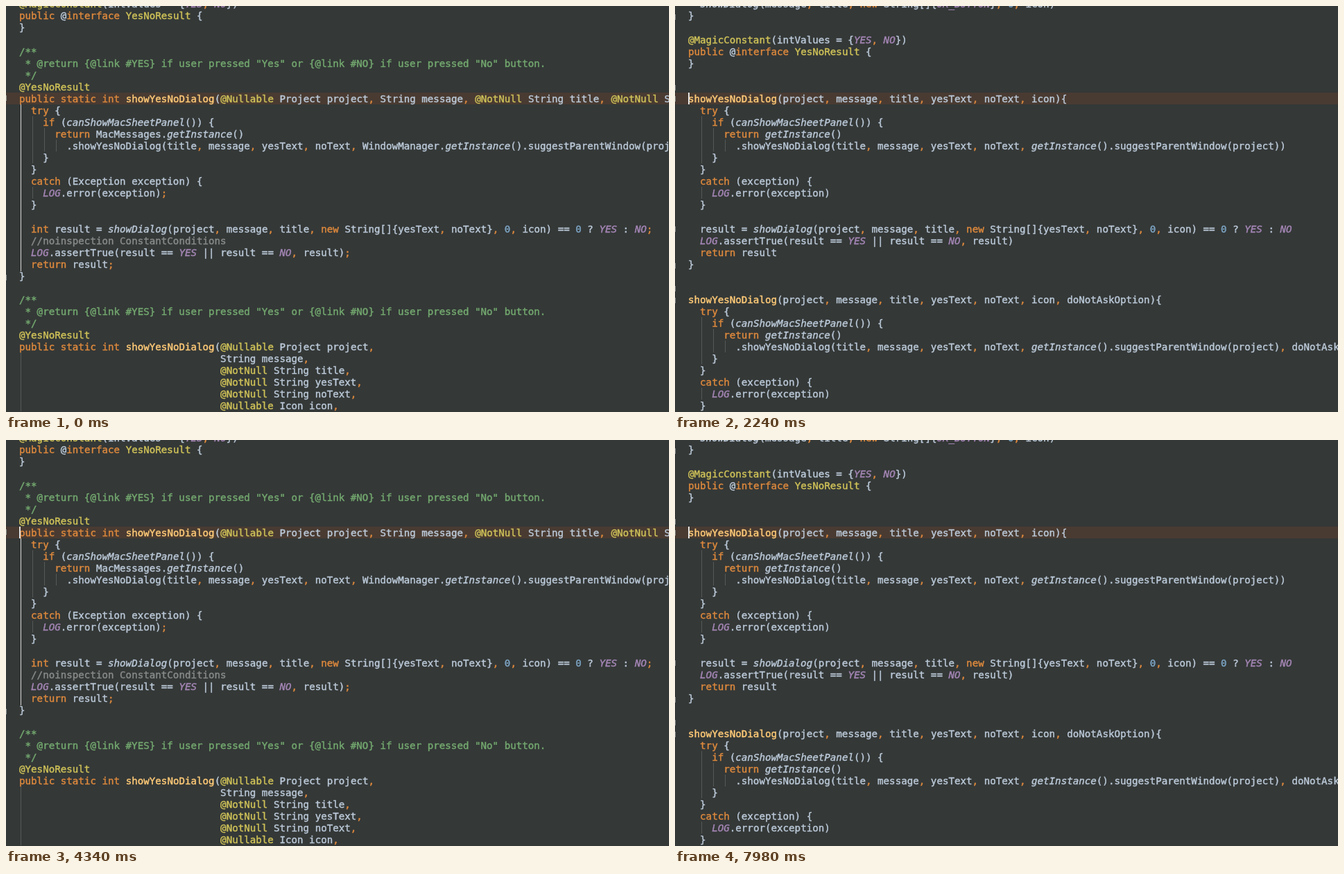
An HTML page that plays this animation: 956x586 px, repeating every 8000 ms.

```html
<!DOCTYPE html>
<html lang="en">
<head>
<meta charset="utf-8">
<title>Code folding</title>
<style>
html, body { margin: 0; width: 100%; height: 100%; overflow: hidden; background: #343837; }
.view { position: absolute; inset: 0; overflow: hidden; }
.view i { position: absolute; }
#row { position: absolute; top: 125px; width: 100%; height: 17px; background: #493b32; }
#caret { position: absolute; left: 19px; top: 125px; width: 1.5px; height: 17px; background: #e4e4e2; }
pre {
  position: absolute; left: 19px; top: -10.7px; margin: 0;
  font: 14.18px/17.07px "DejaVu Sans Mono", "Liberation Mono", monospace;
  font-variant-ligatures: none; color: #bac8d7; -webkit-text-stroke: .45px;
}
.key, .sep { color: #dc883d; }
.note { color: #cdc058; }
.doc { color: #73a86f; }
.rem { color: #878a89; }
.const { color: #a385b4; font-style: italic; }
.call { font-style: italic; }
.num { color: #7ba3c2; }
.def { color: #fdc977; }
</style>
</head>
<body>
<div id="row"></div>
<div class="view" id="full"></div>
<div class="view" id="brief"></div>
<div id="caret"></div>
<script>
const ROW = 17.07, TOP = -11.9;

const head = `@MagicConstant(intValues = {YES, NO})
public @interface YesNoResult {
}
`;
const doc = `/**
 * @return {@link #YES} if user pressed "Yes" or {@link #NO} if user pressed "No" button.
 */
@YesNoResult
`;
const param = " ".repeat(34);

const fullText = `${head}
${doc}public static int showYesNoDialog(@Nullable Project project, String message, @NotNull String title, @NotNull String yesText,
  try {
    if (canShowMacSheetPanel()) {
      return MacMessages.getInstance()
        .showYesNoDialog(title, message, yesText, noText, WindowManager.getInstance().suggestParentWindow(project));
    }
  }
  catch (Exception exception) {
    LOG.error(exception);
  }

  int result = showDialog(project, message, title, new String[]{yesText, noText}, 0, icon) == 0 ? YES : NO;
  //noinspection ConstantConditions
  LOG.assertTrue(result == YES || result == NO, result);
  return result;
}

${doc}public static int showYesNoDialog(@Nullable Project project,
` + ["String message,", "@NotNull String title,", "@NotNull String yesText,",
     "@NotNull String noText,", "@Nullable Icon icon,"].map(s => param + s).join("\n");

const briefBody = extra => `showYesNoDialog(project, message, title, yesText, noText, icon${extra}){
  try {
    if (canShowMacSheetPanel()) {
      return getInstance()
        .showYesNoDialog(title, message, yesText, noText, getInstance().suggestParentWindow(project)${extra})
    }
  }
  catch (exception) {
    LOG.error(exception)
  }
`;
const briefText = `  showDialog(message, title, new String[]{OK_BUTTON}, 0, icon)
}

${head}

${briefBody("")}
  result = showDialog(project, message, title, new String[]{yesText, noText}, 0, icon) == 0 ? YES : NO
  LOG.assertTrue(result == YES || result == NO, result)
  return result
}


${briefBody(", doNotAskOption")}`;

const rules = [
  ["doc", /^(?:\/\*\*| \*).*/],
  ["rem", /\/\/.*/],
  ["note", /@(?!interface)\w+|(?<!@)\bYesNoResult\b/],
  ["key", /\b(?:public|static|int|interface|try|if|return|catch|new)\b/],
  ["const", /\b(?:YES|NO|LOG|OK_BUTTON)\b/],
  ["call", /\b(?:canShowMacSheetPanel|getInstance|showDialog)\b/],
  ["def", /(?<!\.)\bshowYesNoDialog\b/],
  ["num", /\b\d+\b/],
  ["sep", /[,;]/],
];
const lexer = new RegExp(rules.map(([name, re]) => `(?<${name}>${re.source})`).join("|"), "gm");

function paint(text) {
  return text.replace(lexer, (...m) => {
    const kind = Object.entries(m.at(-1)).find(e => e[1] !== undefined)[0];
    return `<span class="${kind}">${m[0]}</span>`;
  });
}

const bar = (x, y, w, h, color) =>
  `<i style="left:${x}px;top:${y}px;width:${w}px;height:${h}px;background:${color}"></i>`;
const guide = (x, row, count) =>
  bar(x, Math.round(TOP + row * ROW), 1, Math.round(count * ROW), "#555a58");
// Guides of a method body whose "try" sits on the given row
const guides = row => guide(38, row + 1, 4) + guide(55, row + 2, 2) + guide(72, row + 3, 1) + guide(38, row + 7, 1);
const marks = list => list.map(y => bar(0, y - 4, 1, 8, "#8d918f")).join("");

full.innerHTML = guides(9) + guide(21, 30, 5) + bar(21, 142, 1, 241, "#d5d8d6") +
  marks([133, 392]) + `<pre>${paint(fullText)}</pre>`;
brief.innerHTML = guides(9) + guides(26) +
  marks([16, 118, 134, 322, 375, 408, 425]) + `<pre>${paint(briefText)}</pre>`;

const within = (t, spans) => spans.some(([a, b]) => t >= a && t < b);
const briefSpans = [[2240, 4200], [6720, 8000]];
const caretSpans = [[140, 700], [1260, 1680], [2240, 2800], [3220, 3780],
  [4200, 4760], [5320, 5880], [6300, 7280], [7700, 8000]];
const show = (el, on) => { el.style.visibility = on ? "visible" : "hidden"; };

function frame(now) {
  const t = now % 8000, folded = within(t, briefSpans);
  show(full, !folded);
  show(brief, folded);
  show(caret, within(t, caretSpans));
  requestAnimationFrame(frame);
}
frame(0);
</script>
</body>
</html>
```
